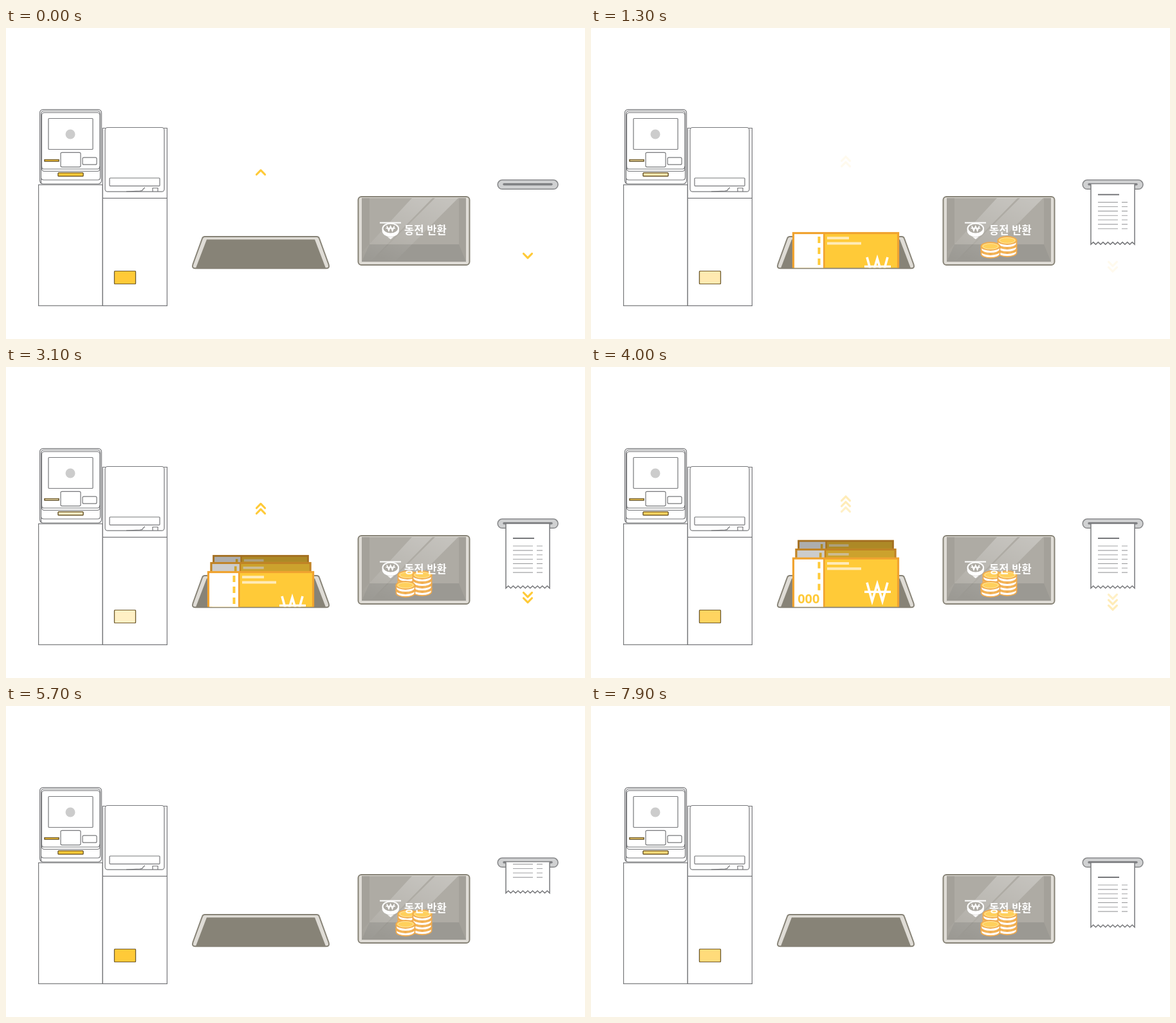
Write an HTML page that moves like this. It is 900 by 483 pixels and loops after 8000 ms.

```html
<!DOCTYPE html>
<html lang="ko">
<head>
<meta charset="utf-8">
<title>동전 반환</title>
<style>
  html, body { margin: 0; width: 100%; height: 100%; overflow: hidden; background: #fff; }
  svg { display: block; width: 100%; height: 100%; }
  .machine { fill: #fff; stroke: #77787b; stroke-width: 1.2; }
  .lamp { fill: #ffca38; stroke: #6f5a2a; stroke-width: 1.2; }
  .chevron { fill: none; stroke: #ffca38; stroke-width: 3.2; stroke-linecap: round; stroke-linejoin: round; }
  .frame { fill: #dfdcd6; stroke: #878377; stroke-width: 2; }
  .label { font: 700 16.6px "Noto Sans CJK KR", "Noto Sans CJK", "Noto Sans", sans-serif; fill: #fff; }
  .serial { font: 700 20px "Noto Sans", "Open Sans", sans-serif; fill: #ffca38; }
</style>
</head>
<body>
<svg viewBox="0 0 900 483">
  <defs>
    <clipPath id="trayClip"><rect x="290" y="200" width="215" height="172.6"/></clipPath>
    <clipPath id="slotClip"><rect x="765" y="242.5" width="95" height="120"/></clipPath>
    <clipPath id="glassClip"><rect x="553" y="264" width="162" height="99"/></clipPath>
    <linearGradient id="shine" x1="0.8" y1="0" x2="0.2" y2="1">
      <stop offset="0" stop-color="#fff" stop-opacity=".28"/>
      <stop offset="1" stop-color="#fff" stop-opacity="0"/>
    </linearGradient>
    <!-- Banknote, top edge at y = 0 -->
    <g id="note">
      <rect x="314.5" y="1.5" width="163" height="80.5" fill="#ffca38"/>
      <rect x="316" y="2" width="45" height="79" fill="#fff"/>
      <path d="M354.5 7V56" stroke="#ffca38" stroke-width="4" stroke-dasharray="10 7"/>
      <path d="M362.3 2V82" stroke="#f0a330" stroke-width="2.6"/>
      <path d="M367 9.3h34M367 17.5h53" stroke="#ffebb8" stroke-width="4"/>
      <path d="M429 39l8 29 8-27 8 27 8-29M425 53.5h41" fill="none" stroke="#fff" stroke-width="3.6"/>
      <text class="serial" x="338.3" y="71" text-anchor="middle">000</text>
      <rect x="314.5" y="1.5" width="163" height="80.5" fill="none" stroke="#f0a330" stroke-width="3.2"/>
    </g>
    <g id="coin">
      <path d="M-14.5 0V5A14.5 6 0 0 0 14.5 5V0Z" fill="#fff" stroke="#f0ab4e" stroke-width="1.8"/>
      <ellipse rx="14.5" ry="6" fill="#ffd05c" stroke="#f0ab4e" stroke-width="1.8"/>
      <ellipse rx="12" ry="4.3" fill="none" stroke="#ffe3a0" stroke-width="1"/>
    </g>
  </defs>

  <g class="machine">
    <rect x="52.5" y="126.7" width="96" height="115.3" rx="5"/>
    <path d="M54.5 242V134q0-5 4-5h84q4 0 4 5V232q0 4-4 4H59q-4.500 0-4.500-4" fill="none"/>
    <rect x="55.5" y="131.500" width="90.500" height="91" rx="4"/>
    <path d="M55.5 215q0 4 3 4h84q3 0 3-4" fill="none"/>
    <rect x="66" y="140.500" width="69" height="48" rx="1"/>
    <rect x="85" y="193.300" width="31" height="22.500" rx="2"/>
    <rect x="119" y="201.200" width="22" height="11" rx="2"/>
    <rect x="50.600" y="243.500" width="99.600" height="187.800"/>
    <path d="M150.300 431.300V155.500H250.400V431.300Z"/>
    <path d="M150.300 264.400H250.400"/>
    <rect x="154" y="154.500" width="92" height="99.700" rx="4"/>
    <rect x="161" y="233" width="78" height="12.300" rx="1"/>
    <path d="M187 254l21-.8q5-.5 5-3l3-2.500M228 254v-5.500h8v5.500" fill="none"/>
  </g>
  <circle cx="100" cy="165" r="7.500" fill="#ccc"/>
  <g class="machine">
    <rect x="60" y="204.500" width="22" height="2.500"/>
    <rect x="81" y="224.800" width="39" height="5.400" rx="1"/>
    <rect x="168.500" y="377.500" width="33" height="20" rx="1"/>
  </g>
  <g id="lamps" class="lamp">
    <rect x="60" y="204.500" width="22" height="2.500"/>
    <rect x="81" y="224.800" width="39" height="5.400" rx="1"/>
    <rect x="168.500" y="377.500" width="33" height="20" rx="1"/>
  </g>

  <path class="frame" d="M309 324H483Q486 324 487 327L501.500 367Q503.500 373.300 498 373.300H294Q288.500 373.300 290.500 367L305 327Q306 324 309 324Z"/>
  <path d="M312 328.500H480L497 373H295Z" fill="#878377"/>
  <g clip-path="url(#trayClip)"><g id="notes"></g></g>

  <rect class="frame" x="547.500" y="262" width="173" height="106" rx="5"/>
  <rect x="553" y="264" width="162" height="99" fill="#a4a19a"/>
  <rect x="565" y="264" width="139" height="72" fill="#aeaba4"/>
  <path d="M553 363L565 336H704L715 363Z" fill="#9b9993"/>
  <g clip-path="url(#glassClip)" fill="url(#shine)">
    <path d="M632 263H664L566 363H540Z"/>
    <path d="M668 263H704L604 363H568Z"/>
  </g>
  <g id="coins"></g>
  <g fill="none" stroke="#fff">
    <path d="M581 302.500H614" stroke-width="2"/>
    <path d="M585.500 312v3a12.300 8.500 0 0 0 24.600 0v-3" fill="#fff" stroke-width="1.500"/>
    <ellipse cx="597.800" cy="311.500" rx="12.300" ry="8" fill="#aeaba4" stroke-width="2"/>
    <path d="M592 307.500l3 7.500 2.800-7 2.800 7 3-7.500M590.500 311h14.600" stroke-width="1.700"/>
    <path d="M593 324.500h9.500l-4.700 3.600Z" fill="#fff" stroke="none"/>
  </g>
  <text class="label" x="619" y="320">동전 반환</text>

  <rect x="764.300" y="236" width="93.700" height="14.300" rx="7.100" fill="#d0d1d2" stroke="#87888a" stroke-width="1.600"/>
  <path d="M774 242.700H848" stroke="#808184" stroke-width="3.400" stroke-linecap="round"/>
  <g clip-path="url(#slotClip)"><g id="receipt"></g></g>
  <g id="chevrons" class="chevron"></g>
</svg>
<script>
const LOOP = 8000;
const byId = id => document.getElementById(id);
const clamp = v => Math.max(0, Math.min(1, v));
const progress = (t, start, end) => clamp((t - start) / (end - start));
const easeOut = p => 1 - (1 - p) ** 2;

function add(parent, tag, attrs) {
  const el = document.createElementNS("http://www.w3.org/2000/svg", tag);
  for (const key in attrs) el.setAttribute(key, attrs[key]);
  return parent.appendChild(el);
}

// Back to front; smaller and darker towards the back
const notes = [
  { top: 292, scale: 0.9, shade: 0.32, start: 2000, lift: 31 },
  { top: 303, scale: 0.946, shade: 0.2, start: 1300, lift: 28 },
  { top: 317, scale: 1, shade: 0, start: 200, lift: 28.3 }
];
for (const note of notes) {
  note.el = add(byId("notes"), "g", {});
  add(note.el, "use", { href: "#note" });
  add(note.el, "rect", { x: 312.9, width: 166.2, height: 83.6, "fill-opacity": note.shade });
}

const coins = [];
function stack(x, bottom, times) {
  times.forEach((start, i) => coins.push({
    start,
    el: add(byId("coins"), "use", { href: "#coin", x, y: bottom - i * 7 })
  }));
}
stack(624, 337, [1900, 2100, 2300]);
stack(647, 344, [500, 700, 900, 2500]);
stack(621, 346, [300, 1100]);

const receipt = byId("receipt");
let outline = "M777 243V343.500";
for (let i = 0; i < 9; i++) outline += "l3.780 -3.500l3.780 3.500";
add(receipt, "path", { d: outline + "V243Z", fill: "#fff", stroke: "#77787b", "stroke-width": 1.5 });
add(receipt, "path", { d: "M788 266H821", stroke: "#77787b", "stroke-width": 2 });
for (let i = 0; i < 7; i++) {
  add(receipt, "path", { d: `M788 ${278 + i * 6.85}h31m6 0h9`, stroke: "#a2a3a5", "stroke-width": 1.1 });
}

const chevrons = [];
for (const [x, y, dir] of [[396, 224.2, -1], [811, 353.8, 1]]) {
  for (let i = 0; i < 3; i++) {
    const d = `M${x - 6.5} ${y - 3.3 * dir}l6.500 ${6.6 * dir}l6.500 ${-6.6 * dir}`;
    chevrons.push({ i, dir, el: add(byId("chevrons"), "path", { d }) });
  }
}

function draw(t) {
  const fromPeak = Math.abs(t / 1890 - Math.round(t / 1890)) * 2;
  byId("lamps").setAttribute("fill-opacity", clamp(1.04 * (1 - fromPeak)));

  const phase = t % 3050;
  for (const { i, dir, el } of chevrons) {
    const fade = progress(phase, 120, i ? 1410 : 1280);
    const drift = 4.5 * progress(phase, 120, 1410);
    el.setAttribute("opacity", phase >= [0, 40, 110][i] ? 1 - fade : 0);
    el.setAttribute("transform", `translate(0 ${dir * (i * 8.5 + drift)})`);
  }

  const lifted = easeOut(progress(t, 3700, 4300));
  for (const { el, top, scale, start, lift } of notes) {
    const rise = easeOut(progress(t, start, start + 700));
    const y = 376 + (top - 376) * rise - lift * lifted;
    el.setAttribute("transform", `translate(${396 * (1 - scale)} ${y}) scale(${scale})`);
  }
  byId("notes").setAttribute("opacity", 1 - progress(t, 4200, 4880));

  for (const { el, start } of coins) el.setAttribute("opacity", progress(t, start, start + 150));

  const printed = progress(t, t < 5020 ? 0 : 5020, t < 5020 ? 1400 : 6420);
  receipt.setAttribute("transform", `translate(0 ${-103 * (1 - printed)})`);
  receipt.setAttribute("visibility", printed > 0 ? "visible" : "hidden");
}

const begin = performance.now();
function tick() {
  // The picture advances in steps of a tenth of a second
  draw(Math.floor((performance.now() - begin) % LOOP / 100) * 100);
  requestAnimationFrame(tick);
}
tick();
</script>
</body>
</html>
```
